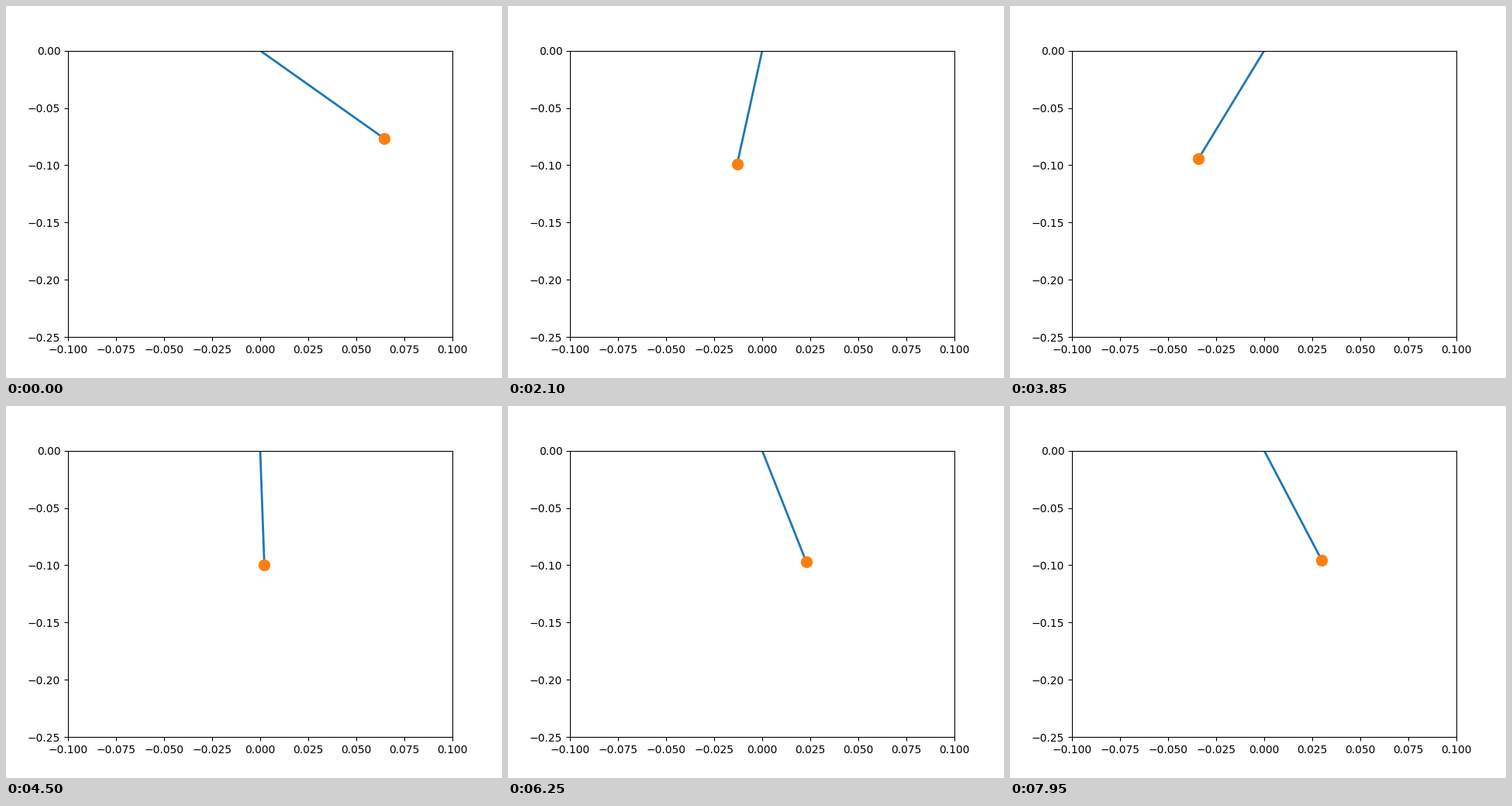
Recreate the animation shown at these times as a matplotlib script. Size 640 by 480 pixels, loop 8000 ms.

```python
import numpy as np
import matplotlib.pyplot as plt
from matplotlib.animation import FuncAnimation

FRAMES, INTERVAL = 160, 50
LENGTH = 0.1        # rod length
SWING = 0.7         # starting angle, rad
DECAY = 0.003       # damping per step
PERIOD = 32.6       # steps per swing
LAG = 0.14          # phase offset, steps

plt.rcParams["font.family"] = "DejaVu Sans"
fig, ax = plt.subplots(figsize=(6.4, 4.8), dpi=100)
ax.set_xlim(-0.1, 0.1)
ax.set_ylim(-0.25, 0)

rod, = ax.plot([], [], color="#1f77b4", lw=2)
bob, = ax.plot([], [], "o", color="#ff7f0e", ms=10)


def angle(step):
    phase = 2 * np.pi * (step - LAG) / PERIOD
    return SWING * np.exp(-DECAY * step) * np.cos(phase)


def draw(step):
    a = angle(step)
    x, y = LENGTH * np.sin(a), -LENGTH * np.cos(a)
    rod.set_data([0, x], [0, y])
    bob.set_data([x], [y])
    return rod, bob


anim = FuncAnimation(fig, draw, frames=FRAMES, interval=INTERVAL,
                     init_func=lambda: draw(0), repeat=True, repeat_delay=0)
plt.show()
```
